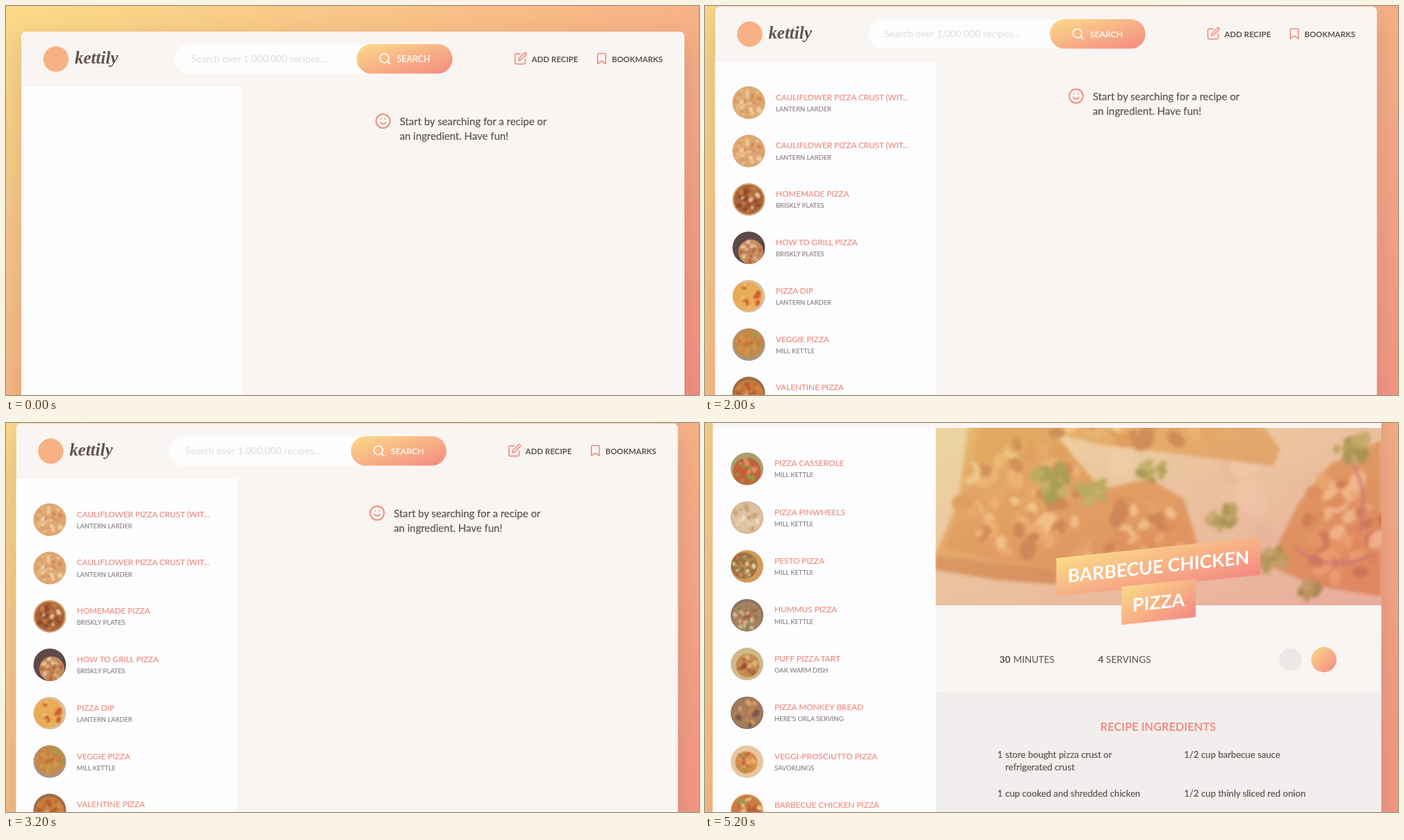
An HTML page that plays this animation: 998x561 px, repeating every 6 s.

```html
<!DOCTYPE html>
<html lang="en">
<head>
<meta charset="utf-8">
<title>Recipe search</title>
<style>
  html, body { margin: 0; width: 100%; height: 100%; overflow: hidden; }
  svg { display: block; width: 998px; height: 561px; font-family: Lato, "Open Sans", sans-serif; }
  .icon { fill: none; stroke-width: 2; stroke-linecap: round; stroke-linejoin: round; }
  .shadow { fill: #615551; opacity: .2; filter: blur(20px); }
  .semi { stroke: currentColor; stroke-width: .2px; }
  .soft { filter: blur(.8px); }
  .softer { filter: blur(2.5px); }
</style>
</head>
<body>
<svg id="stage" viewBox="0 0 998 561"></svg>
<script>
const PAPER = '#f9f5f3', WHITE = '#fdfdff', DARK = '#5f534f', CORAL = '#ee8f81', GREY = '#918581', WARM = 'url(#warm)';

let seed = 1;
const random = () => (seed = seed * 16807 % 2147483647) / 2147483647;
const pick = list => list[Math.floor(random() * list.length)];

const rect = (x, y, w, h, fill, extra = '') =>
  `<rect x="${x}" y="${y}" width="${w}" height="${h}" fill="${fill}" ${extra}/>`;
const circle = (x, y, r, fill) => `<circle cx="${x}" cy="${y}" r="${r}" fill="${fill}"/>`;
const shape = (points, fill) => `<polygon points="${points}" fill="${fill}"/>`;
const text = (x, y, size, fill, words, extra = '') =>
  `<text x="${x}" y="${y}" font-size="${size}" fill="${fill}" color="${fill}" ${extra}>${words}</text>`;
const icon = (x, y, scale, stroke, d) =>
  `<path class="icon" transform="translate(${x} ${y}) scale(${scale})" stroke="${stroke}" d="${d}"/>`;

// Ellipses spread evenly around a centre along a sunflower spiral
function scatter(count, x, y, rx, ry, size, colors) {
  let out = '';
  for (let i = 0; i < count; i++) {
    const a = i * 2.4 + random(), d = Math.sqrt((i + .5) / count), s = size * (.6 + random() * .7);
    const place = `translate(${x + rx * d * Math.cos(a)} ${y + ry * d * Math.sin(a)}) rotate(${random() * 180})`;
    out += `<ellipse transform="${place}" rx="${s}" ry="${s * .7}" fill="${pick(colors)}"/>`;
  }
  return out;
}

function backdrop(x, y, w, h, pageTop, pageHeight) {
  return rect(0, pageTop, 998, pageHeight, WARM) +
    rect(x - 4, y + 11, w + 8, h, DARK, 'class="shadow"') +
    rect(x, y, w, h, PAPER, 'rx="6.5"');
}

function home() {
  return rect(22, 116, 318.5, 700, WHITE) +
    circle(72, 76.5, 18.3, '#f8b184') +
    text(99, 83, 25, DARK, 'kettily', 'font-family="Liberation Serif, serif" font-weight="700" font-style="italic"') +
    rect(243, 55, 380, 42.5, WHITE, 'rx="21.2"') +
    text(266.5, 81, 14, '#e2dad7', 'Search over 1,000,000 recipes...') +
    rect(505, 55, 138, 42.5, WARM, 'rx="21.2"') +
    icon(536, 66.5, .8, '#fff', 'M19 11a8 8 0 1 1-16 0a8 8 0 1 1 16 0M21 21l-4.35-4.35') +
    text(563, 80.5, 12.4, '#fff', 'SEARCH', 'class="semi"') +
    icon(731.5, 65.6, .82, CORAL, 'M11 4H4a2 2 0 0 0-2 2v14a2 2 0 0 0 2 2h14a2 2 0 0 0 2-2v-7M18.5 2.5a2.12 2.12 0 0 1 3 3L12 15l-4 1 1-4z') +
    text(757, 80.5, 11.5, DARK, 'ADD RECIPE', 'font-weight="700"') +
    icon(848, 66, .82, CORAL, 'M19 21l-7-5-7 5V5a2 2 0 0 1 2-2h10a2 2 0 0 1 2 2z') +
    text(872.5, 80.5, 11.3, DARK, 'BOOKMARKS', 'font-weight="700"') +
    icon(531, 154, 1, CORAL, 'M22 12a10 10 0 1 1-20 0a10 10 0 1 1 20 0M8 14s1.5 2 4 2 4-2 4-2M9 9h.01M15 9h.01') +
    text(567, 172, 14.95, DARK, 'Start by searching for a recipe or', 'class="semi"') +
    text(567, 193, 14.95, DARK, 'an ingredient. Have fun!', 'class="semi"');
}

// look: table colour, dish colour, dish x, dish y, dish radius, topping size, topping colours
function thumbnail(x, y, [table, dish, dx, dy, r, size, ...toppings], id) {
  seed = 37 * id + 11;
  return `<g transform="translate(${x} ${y})" clip-path="url(#round)">` +
    circle(0, 0, 24, table) + circle(dx, dy, r, dish) + '<g class="soft">' +
    scatter(Math.round(r * r / size / size / 1.6), dx, dy, r * .85, r * .85, size, toppings) + '</g></g>';
}

function results(x, top, pitch, textX, size, items) {
  return items.map(([title, author, look], i) => {
    const y = top + pitch * i;
    return thumbnail(x, y, look, title.length) +
      text(textX, y - 3.8, size, CORAL, title, 'class="semi"') +
      text(textX, y + 12.4, size * .8, GREY, author, 'class="semi"');
  }).join('');
}

function leaves(x, y, size) {
  return scatter(12, x, y, size, size * .75, size * .4, ['#5c7a24', '#7d9438', '#95a355']);
}

function hero() {
  seed = 77;
  const crust = '#cf9450', bake = '#c9803f', toppings = ['#a8552a', '#c67436', '#dda05a', '#e8c48c', '#d08a48'];
  return '<g clip-path="url(#photo)">' + rect(332, 7, 642, 256, '#dfd0b8') + '<g class="softer">' +
    scatter(24, 700, 130, 200, 110, 24, ['#d8c8b2', '#e4d8c6', '#dccdb9']) +
    shape('380,0 490,0 570,95 590,150 505,233 420,226 332,212 332,190 365,110', crust) +
    shape('395,0 490,0 570,95 575,150 505,208 420,198 345,180 378,100', bake) +
    scatter(60, 460, 108, 92, 82, 13, toppings) +
    shape('332,192 420,202 505,210 505,232 420,226 332,212', '#b9743c') +
    shape('470,0 800,0 828,38 818,62 700,47 560,30', crust) +
    scatter(26, 620, 10, 125, 18, 12, toppings) +
    shape('575,95 640,80 690,110 715,195 650,250 545,230', bake) +
    scatter(30, 630, 165, 58, 65, 12, toppings) +
    shape('855,115 900,60 974,25 974,250 880,235 810,205', bake) +
    scatter(42, 920, 150, 62, 75, 13, toppings) +
    '<path d="M925 48q35 45 18 110M850 180q50 40 110 10" fill="none" stroke="#a9506a" stroke-width="4"/>' +
    leaves(500, 85, 30) + leaves(560, 98, 22) + leaves(645, 68, 20) + leaves(744, 136, 22) +
    leaves(818, 195, 21) + leaves(932, 36, 25) + leaves(870, 240, 15) + '</g>' +
    rect(332, 7, 642, 256, WARM, 'opacity=".5"') + '</g>';
}

const banner = (x, y, w, words) =>
  `<g transform="translate(${x} ${y}) skewY(-6)">` + rect(-w / 2, -27.5, w, 55, WARM) +
  text(0, 9.5, 26.6, '#fff', words, 'text-anchor="middle" font-weight="700"') + '</g>';

function recipe() {
  const line = (x, y, words) => text(x, y, 13.15, DARK, words, 'class="semi"');
  return rect(11.3, 7, 321.2, 560, WHITE) + hero() +
    banner(653, 207, 294, 'BARBECUE CHICKEN') + banner(653.2, 258, 107, 'PIZZA') +
    text(424, 346, 13.7, DARK, '30', 'font-weight="700"') + text(444, 346, 13.4, DARK, 'MINUTES') +
    text(566, 346, 13.7, DARK, '4', 'font-weight="700"') + text(577.5, 346, 13.7, DARK, 'SERVINGS') +
    circle(843, 341.3, 16.2, '#ece8e7') + circle(891.2, 341.3, 18.2, WARM) +
    rect(332.5, 388, 641.5, 180, '#f2eeee') +
    text(652.5, 444, 16.4, CORAL, 'RECIPE INGREDIENTS', 'text-anchor="middle" font-weight="700"') +
    line(421, 483, '1') + line(432.5, 483, 'store bought pizza crust or') +
    line(432.5, 501, 'refrigerated crust') + line(690, 483, '1/2 cup barbecue sauce') +
    line(421, 539, '1') + line(432.5, 539, 'cup cooked and shredded chicken') +
    line(690, 539, '1/2 cup thinly sliced red onion');
}

const cauliflower = ['CAULIFLOWER PIZZA CRUST (WIT...', 'LANTERN LARDER',
  ['#d9b184', '#dfa873', 0, 1, 24, 3, '#efd0a4', '#cf8854', '#e6bc88', '#d99c66']];
const found = [
  cauliflower, cauliflower,
  ['HOMEMADE PIZZA', 'BRISKLY PLATES', ['#cf9c66', '#a9623a', 0, 0, 21, 4, '#93482a', '#e3c295', '#c57a44']],
  ['HOW TO GRILL PIZZA', 'BRISKLY PLATES', ['#5d4a48', '#c58a5a', 3, 6, 18, 3, '#e7c9a5', '#b5623c', '#d49a68']],
  ['PIZZA DIP', 'LANTERN LARDER', ['#d8c0a0', '#e9ad57', -2, 0, 21, 4.5, '#cf5f35', '#f0c070', '#e9ad57']],
  ['VEGGIE PIZZA', 'MILL KETTLE', ['#a79482', '#c58a48', 0, -2, 21, 3.5, '#a39b4a', '#d9934a', '#c96f3a']],
  ['VALENTINE PIZZA', 'MILL KETTLE', ['#9d6b48', '#c87c3c', 0, 2, 21, 3, '#e0a861', '#b65a2e', '#d58b48']]
];
const more = [
  ['PIZZA CASSEROLE', 'MILL KETTLE', ['#a9a06a', '#c0643c', 0, 4, 20, 4, '#cf5a34', '#dd9068', '#8f9a48']],
  ['PIZZA PINWHEELS', 'MILL KETTLE', ['#d3ae8c', '#dcc0a0', 0, 0, 22, 4, '#f0dcc2', '#cda078', '#e6caa8']],
  ['PESTO PIZZA', 'MILL KETTLE', ['#d39a5c', '#9c7040', -4, -1, 19, 3, '#e4d7ac', '#a9985a', '#c98a50']],
  ['HUMMUS PIZZA', 'MILL KETTLE', ['#8e7560', '#a98262', 0, 2, 21, 3, '#7f8350', '#d3b894', '#a9543e']],
  ['PUFF PIZZA TART', 'OAK WARM DISH', ['#cdb98a', '#c58a50', 1, 2, 17, 4, '#94502e', '#dcb276', '#a86a3c']],
  ['PIZZA MONKEY BREAD', 'HERE\'S ORLA SERVING', ['#8d7062', '#a57a5c', 0, 0, 22, 5, '#d9a266', '#c08450', '#7c5648']],
  ['VEGGI-PROSCIUTTO PIZZA', 'SAVORLINGS', ['#e7c6a0', '#d88e4c', -1, 1, 16, 3, '#c4583a', '#e6b068', '#a98a48']],
  ['BARBECUE CHICKEN PIZZA', 'MILL KETTLE', ['#d9a468', '#c97c40', 0, 0, 22, 4, '#e8c48c', '#b55c30', '#a39a4c']]
];

const scenes = [
  backdrop(22, 37, 955, 700, 0, 660) + home(),
  backdrop(14.8, .8, 952.8, 800, -36, 850) +
    `<g transform="translate(-7.4 -35.8) scale(.998)">${home()}</g>` +
    results(63, 139.3, 69.8, 102, 11.7, found),
  backdrop(11.3, -80, 962.7, 900, -120, 1000) + recipe() + results(60.5, 66, 70.4, 100, 11.8, more)
];

const stage = document.getElementById('stage');
stage.innerHTML = `<defs>
  <linearGradient id="warm" x2="1" y2="1"><stop stop-color="#fbdb89"/><stop offset="1" stop-color="#f48982"/></linearGradient>
  <clipPath id="round"><circle r="23.5"/></clipPath>
  <clipPath id="photo"><path d="M332.5 7H974V263H332.5z"/></clipPath>
</defs>` + scenes.map(scene => `<g class="scene">${scene}</g>`).join('');

const layers = stage.querySelectorAll('.scene');
const start = performance.now();
function draw() {
  const current = Math.floor((performance.now() - start) % 6000 / 2000);
  layers.forEach((layer, i) => layer.style.display = i === current ? '' : 'none');
  requestAnimationFrame(draw);
}
draw();
</script>
</body>
</html>
```
